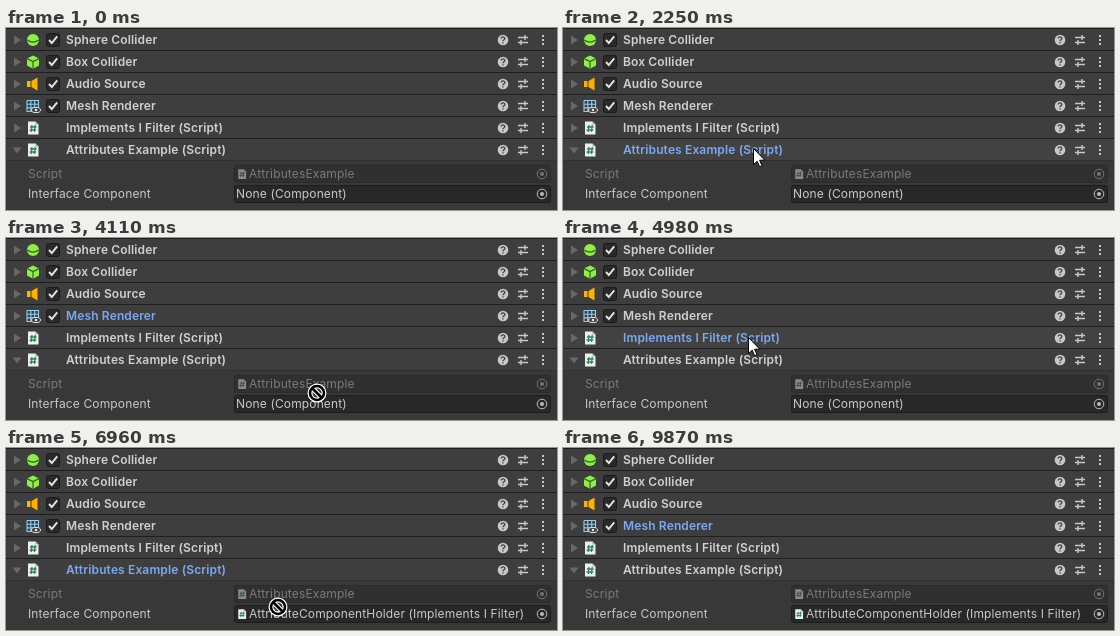
An HTML page for the animation above (9990 ms loop, 551 by 182 pixels).

```html
<!DOCTYPE html>
<html lang="en">
<head>
<meta charset="utf-8">
<title>Interface component field</title>
<style>
  html, body { margin: 0; width: 100%; height: 100%; overflow: hidden; background: #383838; }
  svg { display: block; }
  text { font: 12px Inter, sans-serif; letter-spacing: .14px; fill: #c8c8c8; white-space: pre; }
  .title { font-weight: 600; fill: #d0d0d0; }
  .title.on { fill: #7aa9f2; }
  .head { fill: #3e3e3e; }
  .head.hover { fill: #424242; }
  .dim { opacity: .45; }
  .box { fill: #282828; stroke: #1d1d1d; }
  .box.hover { stroke: #4a4a4a; }
</style>
</head>
<body>
<svg id="stage" width="551" height="182" viewBox="0 0 551 182"></svg>
<script>
const LOOP = 9990, STEP = 30, ROW = 22;
const stage = document.getElementById('stage');

const script = `<path d="M-5 -6.5H2.5L5.5 -3.5V6.5H-5Z" fill="#eee"/>
  <path d="M2.5 -6.5V-3.5H5.5Z" fill="#aaa"/>
  <path d="M-1 -3L-1.8 4M2.2 -3L1.4 4M-3 -1H3.6M-3.4 2H3.2" stroke="#248a4b" stroke-width="1.3"/>`;
const icons = {
  sphere: `<circle r="6" fill="#8df043"/><path d="M-5.6 0Q0 4.4 5.6 0" fill="none" stroke="#3e5a2b" stroke-width="1.3"/>`,
  cube: `<path d="M0 -6.5L6 -3.6V3.6L0 6.8L-6 3.6V-3.6Z" fill="#8df043"/>
    <path d="M-6 -3.4L0 -.4L6 -3.4M0 -.4V6.8" fill="none" stroke="#3e5a2b" stroke-width="1.2"/>`,
  speaker: `<path d="M-6 -3H-2.5V3H-6ZM-1.5 -3L4.5 -6.5V6.5L-1.5 3Z" fill="#ffb000"/>`,
  grid: `<path d="M-6 -5.5H5.5V1M-6 -5.5V5.5H-1M-2.2 -5.5V5.5M1.7 -5.5V1M-6 -1.8H5.5M-6 1.9H0" fill="none" stroke="#8fd0f2" stroke-width="1.1"/>
    <ellipse cx="3" cy="4" rx="4.5" ry="2.6" fill="#3e3e3e" stroke="#e4e4e4"/><circle cx="3" cy="4" r="1.3" fill="#e4e4e4"/>`,
  script
};
const rows = [
  ['Sphere Collider', 'sphere', true],
  ['Box Collider', 'cube', true],
  ['Audio Source', 'speaker', true],
  ['Mesh Renderer', 'grid', true],
  ['Implements I Filter (Script)', 'script'],
  ['Attributes Example (Script)', 'script']
];

const at = (x, y, body, extra = '') => `<g transform="translate(${x} ${y})" ${extra}>${body}</g>`;
const text = (x, y, label, extra = '') => `<text x="${x}" y="${y}" ${extra}>${label}</text>`;

const check = `<rect x="-6.5" y="-6.5" width="13" height="13" rx="2" fill="#292929" stroke="#1a1a1a"/>
  <path d="M-4 0L-1.2 3L4.2 -3.6" fill="none" stroke="#e6e6e6" stroke-width="1.9"/>`;
const tools = at(497, 12, `<circle r="5.3" fill="#c8c8c8"/>
    <path d="M-1.8 -1.4C-1.8 -3.8 2 -3.6 1.8 -1.3C1.7 -.2 0 0 0 1.3M0 2.3V3.6" fill="none" stroke="#3e3e3e" stroke-width="1.3"/>`) +
  at(517, 12, `<path d="M-5 -2.5H5M-5 2.5H5M2 -5V0M-2 0V5" stroke="#c8c8c8" stroke-width="1.4"/>`) +
  at(537, 12, [-4, 0, 4].map(y => `<rect x="-1" y="${y - 1}" width="2" height="2" fill="#c8c8c8"/>`).join(''));

function header([name, icon, checkable], i) {
  const fold = i === 5 ? 'M-4.5 -2.5H4.5L0 3.5Z' : 'M-3 -4.5V4.5L4 0Z';
  return at(0, i * ROW, `<rect class="head" width="551" height="22"/>
    <rect width="551" height="1" fill="#1e1e1e"/>
    ${at(11, 12, `<path d="${fold}" fill="#686868"/>`)}
    ${at(27, 12, icons[icon])}
    ${checkable ? at(47, 12, check) : ''}
    ${text(60, 16, name, 'class="title"')}${tools}`);
}

function field(y, label, body, extra = '') {
  return `<g ${extra}>${text(22, y + 4, label)}
    <rect class="box" x="228.5" y="${y - 8.5}" width="316" height="17" rx="2"/>${body}
    ${at(536, y, '<circle r="4.8" fill="none" stroke="#bbb"/><circle r="2" fill="#bbb"/>')}</g>`;
}
const smallScript = y => at(236, y, `<g transform="scale(.75)">${script}</g>`);

stage.innerHTML = `<rect width="551" height="182" fill="#383838"/>
  ${rows.map(header).join('')}
  <rect y="132" width="551" height="1" fill="#303030"/>
  ${field(146, 'Script', smallScript(146) + text(243, 150, 'AttributesExample'), 'class="dim"')}
  ${field(166, 'Interface Component', `
    <g id="empty">${text(230, 170, 'None (Component)')}</g>
    <g id="filled">${smallScript(166)}${text(243, 170, 'AttributeComponentHolder (Implements I Filter)')}</g>`)}
  <g id="pointer">
    <path id="arrow" d="M.5 .5V16.5L4.2 13.2L6.6 18.7L9 17.7L6.6 12.2H11.8Z" fill="#fff" stroke="#000"/>
    <g id="denied" fill="none" transform="translate(7 6)">
      <g stroke="#fff" stroke-width="5"><circle r="7"/><path d="M-5 -5L5 5"/></g>
      <g stroke="#000" stroke-width="2.6"><circle r="7"/><path d="M-5 -5L5 5"/></g>
    </g>
  </g>`;

const el = id => document.getElementById(id);
const show = (node, on) => node.setAttribute('visibility', on ? 'visible' : 'hidden');
const heads = [...document.querySelectorAll('.head')];
const titles = [...document.querySelectorAll('.title')];
const target = document.querySelectorAll('.box')[1];

// Pointer tip: time, x, y
const path = [
  [60, 560, 62], [630, 172, 11], [1020, 172, 11], [1320, 250, 151], [1440, 290, 167],
  [1770, 290, 167], [2160, 190, 120], [2370, 190, 120], [2730, 295, 166],
  [3210, 295, 166], [3630, 172, 78], [3810, 172, 78], [4110, 304, 149], [4230, 311, 167],
  [4530, 311, 167], [4950, 185, 99], [5130, 185, 99], [5520, 296, 167], [5580, 296, 168],
  [6270, 296, 168], [6570, 190, 120], [6750, 190, 120], [7080, 297, 167],
  [7590, 297, 167], [8070, 175, 78], [8280, 175, 78], [8610, 302, 165],
  [8970, 302, 165], [9480, 562, 48]
];
// Press time and the row that takes focus
const presses = [[660, 0], [2190, 5], [3660, 3], [4980, 4], [6600, 5], [8100, 3]];
// Spans in which the drop is refused
const refusals = [[1030, 1440], [2385, 2865], [3825, 4275], [5145, 5460], [6765, 7080], [8295, 8700]];

function pointerAt(t) {
  const i = path.findIndex(p => p[0] > t);
  if (i < 1) return path[i ? path.length - 1 : 0].slice(1);
  const [t0, x0, y0] = path[i - 1], [t1, x1, y1] = path[i];
  const u = (t - t0) / (t1 - t0), s = u * u * (3 - 2 * u);
  return [Math.round(x0 + (x1 - x0) * s), Math.round(y0 + (y1 - y0) * s)];
}

function draw(now) {
  const time = now % LOOP, t = time - time % STEP;
  const [x, y] = pointerAt(t);
  const denied = refusals.some(([a, b]) => t >= a && t < b);
  const press = presses.filter(p => p[0] <= t).pop();
  const inside = x < 551;
  el('pointer').setAttribute('transform', `translate(${x} ${y})`);
  show(el('denied'), denied);
  show(el('arrow'), !denied);
  show(el('empty'), t < 5760);
  show(el('filled'), t >= 5760);
  titles.forEach((node, i) => node.classList.toggle('on', !!press && press[1] === i));
  heads.forEach((node, i) => node.classList.toggle('hover', inside && !denied && Math.floor(y / ROW) === i));
  target.classList.toggle('hover', !denied && x > 228 && x < 545 && y > 157 && y < 175);
}

const start = performance.now();
function tick() {
  draw(performance.now() - start);
  requestAnimationFrame(tick);
}
tick();
</script>
</body>
</html>
```
